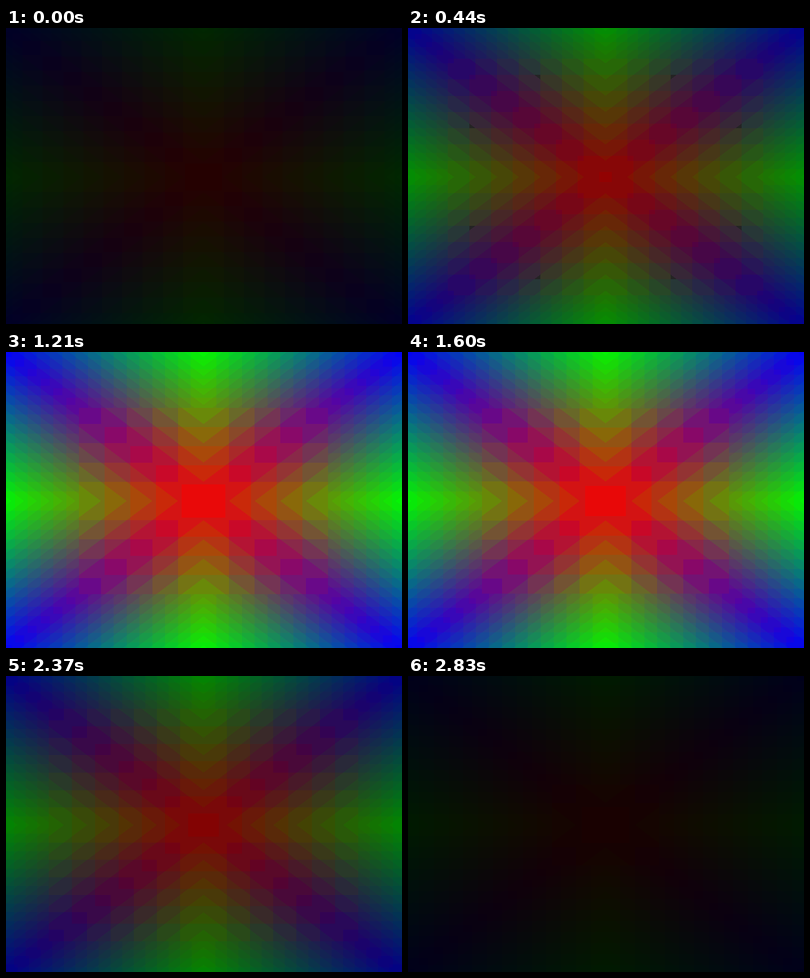
An HTML page with a canvas that plays this animation: 787x588 px, repeating every 2.9 s.

```html
<!DOCTYPE html>
<html lang="en">
<head>
<meta charset="utf-8">
<title>Pulsing colour star</title>
<style>
  html, body { margin: 0; width: 100%; height: 100%; overflow: hidden; background: #000; }
  canvas { display: block; width: 787px; height: 588px; }
</style>
</head>
<body>
<canvas id="stage" width="787" height="588"></canvas>
<script>
const W = 787, H = 588, LOOP = 2900;
const CX = 392.5, CY = 296, RX = 400, RY = 300;
const BUDGET = 178; // how many colour cells a picture may hold

const ctx = document.getElementById('stage').getContext('2d');
const image = ctx.createImageData(W, H);
const pixels = image.data;

function stepAt(t) {
  if (t < 70) return 0;
  if (t < 210) return 1;
  return Math.min(37, 3 + Math.floor((t - 205) / 77.06));
}

// Colour cells are cubes; the strongest reds use cubes of double size.
function cellSizes(level) {
  let fine = 1;
  while ((level / fine) ** 2 > 4 * BUDGET) fine *= 2;
  const merged = (1 - BUDGET / (level / fine) ** 2) / 0.75;
  const share = 1 - Math.sqrt(Math.min(1, Math.max(0, merged)));
  const coarse = 2 * fine;
  return { fine, coarse, limit: coarse * Math.round(share * level / coarse) };
}

function draw(step) {
  const level = 255 * Math.sin(0.156 + 0.0778 * step);
  const { fine, coarse, limit } = cellSizes(level);
  let i = 0;
  for (let y = 0; y < H; y++) {
    const v = Math.abs(y + 0.5 - CY) / RY;
    for (let x = 0; x < W; x++) {
      const u = Math.abs(x + 0.5 - CX) / RX;
      const red = level * (1 - Math.max(u, v));
      const green = level * Math.abs(u - v);
      const blue = level * Math.min(u, v);

      const size = red >= limit ? coarse : fine;
      const r = Math.floor(red / size) * size;
      const g = Math.floor(green / size) * size;
      const b = Math.floor(blue / size) * size;
      const rest = level - r - g - b;

      // Tiny neutral slivers fall to a darker grey.
      const sliver = r === g && g === b && rest < size / 2;
      const k = sliver ? 0.73 : 1;
      const mean = rest / 3;
      pixels[i++] = (r + mean) * k;
      pixels[i++] = (g + mean) * k;
      pixels[i++] = (b + mean) * k;
      pixels[i++] = 255;
    }
  }
  ctx.putImageData(image, 0, 0);
}

const start = performance.now();
let shown = -1;

function tick() {
  const step = stepAt((performance.now() - start) % LOOP);
  if (step !== shown) {
    draw(step);
    shown = step;
  }
  requestAnimationFrame(tick);
}
tick();
</script>
</body>
</html>
```
